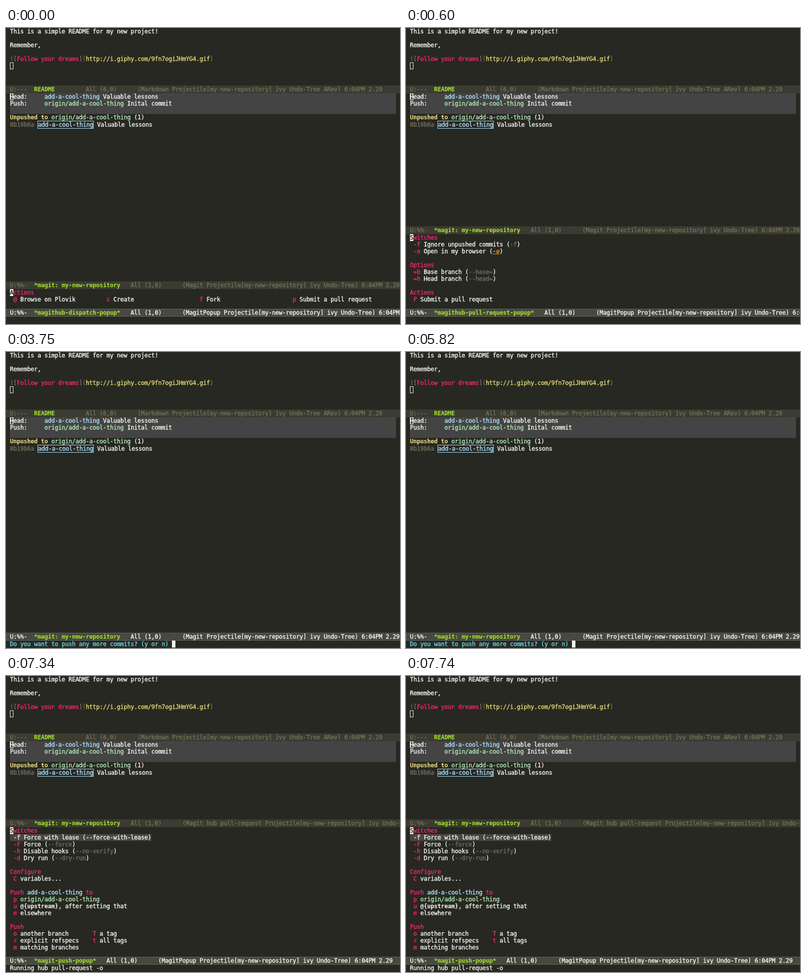
Write an HTML page that moves like this. It is 800 by 603 pixels and loops after 8000 ms.

```html
<!DOCTYPE html>
<html lang="en">
<head>
<meta charset="utf-8">
<title>Editor session</title>
<style>
  html, body { margin: 0; width: 100%; height: 100%; overflow: hidden; background: #272822; }
  #stage {
    position: relative; width: 800px; height: 603px; overflow: hidden;
    background: #272822; color: #f8f8f2;
    font: 12px/14px "DejaVu Sans Mono", monospace; white-space: pre;
    -webkit-text-stroke: 0.35px;
  }
  #stage div { position: absolute; }
  #stage .scene { inset: 0; }
  #stage .bar {
    box-sizing: border-box; left: 0; width: 800px; height: 16px; overflow: hidden;
    border: 1px solid #64645e; border-right: 0; background: #49483e;
  }
  #stage .bar.idle { border-color: #3c3b31; background: #3c3b31; color: #75715e; }
  #stage .shade { left: 8px; top: 133px; width: 784px; height: 42px; background: #444; }
  .p { color: #f92672; }
  .d { color: #75715e; }
  .y { color: #e6db74; }
  .g { color: #b4eeb4; }
  .b { color: #b0e2ff; }
  .c { color: #66d9ef; }
  .n { color: #a6e22e; }
  .t { color: #eedd82; }
  .o { color: #fd971f; font-style: italic; text-decoration: underline; }
  .n, .t, .o, .w { font-weight: bold; -webkit-text-stroke: 0; }
  .k, .h, .l, .r { display: inline-block; height: 14px; vertical-align: top; }
  .k { background: #f8f8f0; color: #272822; }
  .h { box-shadow: inset 0 0 0 1px #f8f8f0; }
  .l { background: #49483e; }
  .r { color: #b0e2ff; border: 1px solid; line-height: 14px; }
</style>
</head>
<body>
<div id="stage"></div>
<script>
const LOOP = 8000, CELL = 7, BOTTOM = 572;
const stage = document.getElementById('stage');

// Make every character exactly one cell wide.
const probe = document.createElement('span');
probe.textContent = 'x'.repeat(100);
stage.append(probe);
const advance = probe.getBoundingClientRect().width / 100;
probe.remove();
stage.style.letterSpacing = `${CELL - advance}px`;

// "~pword~" gives the word the style class p.
const styled = s => s.replace(/~(\w)(.*?)~/g, '<span class="$1">$2</span>');

function add(parent, className, top, html = '') {
  const el = document.createElement('div');
  el.className = className;
  if (top !== null) el.style.top = `${top}px`;
  el.innerHTML = html;
  parent.append(el);
  return el;
}

function text(parent, top, lines, lineHeight = 14) {
  const el = add(parent, '', top, styled(lines.join('\n')));
  el.style.left = '8px';
  el.style.lineHeight = `${lineHeight}px`;
}

function bar(parent, top, idle, name, gap, place, modes, flags = 'U:%%-') {
  const content = ` ${flags}  ~n${name}~${' '.repeat(gap)}All ${place}      ` +
    `(${modes}) 6:04PM 2.29`;
  add(parent, idle ? 'bar idle' : 'bar', top, styled(content));
}

const modeList = (mode, extra = '') => `${mode} Projectile[my-new-repository] ivy Undo-Tree${extra}`;

function magitBar(parent, top, idle, mode = 'Magit') {
  bar(parent, top, idle, '*magit: my-new-repository', 3, '(1,0)', modeList(mode));
}

// Key and label pairs in columns 27 cells wide; the style marks add 3 characters.
const columns = (...items) =>
  ' ' + items.map(([key, label]) => `~p${key}~ ${label}`.padEnd(30)).join('');

// Unchanging upper windows
text(stage, 0, [
  'This is a simple README for my new project!',
  '',
  'Remember,',
  '',
  '~d![~~pFollow your dreams~~d](~~yhttp://i.giphy.com/9fn7ogiJHmYG4.gif~~d)~',
  '~h ~',
]);
bar(stage, 117, true, 'README', 9, '(6,0)', modeList('Markdown', ' ARev'), 'U:---');
add(stage, 'shade', null);
text(stage, 133, [
  '~hH~ead:     ~badd-a-cool-thing~ Valuable lessons',
  'Push:     ~gorigin/add-a-cool-thing~ Inital commit',
  '',
  '~tUnpushed to~ ~gorigin/add-a-cool-thing~ (1)',
]);
text(stage, 189, ['~d8b19b6a~ ~radd-a-cool-thing~ Valuable lessons'], 16);

const running = 'Running hub pull-request -o';

const scenes = [
  { start: 0, split: 516, popup: '*magithub-dispatch-popup*', lines: [
    '~kA~~pctions~',
    columns(['@', 'Browse on Plovik'], ['c', 'Create'], ['f', 'Fork'], ['p', 'Submit a pull request']),
  ] },
  { start: 600, split: 404, popup: '*magithub-pull-request-popup*', lines: [
    '~kS~~pwitches~',
    ' ~p-f~ Ignore unpushed commits (~d-f~)',
    ' ~p-o~ Open in my browser (~o-o~)',
    '',
    '~pOptions~',
    ' ~p=b~ Base branch (~d--base=~)',
    ' ~p=h~ Head branch (~d--head=~)',
    '',
    '~pActions~',
    ' ~pP~ Submit a pull request',
  ] },
  { start: 3750, echo: '~cDo you want to push any more commits? (y or n) ~~k ~' },
  { start: 7200, echo: running },
  { start: 7340, split: 292, mode: 'Magit hub pull-request', popup: '*magit-push-popup*', echo: running, lines: [
    '~kS~~pwitches~',
    '~l -f Force with lease (--force-with-lease)~',
    ' ~p-F~ Force (~d--force~)',
    ' ~p-h~ Disable hooks (~d--no-verify~)',
    ' ~p-d~ Dry run (~d--dry-run~)',
    '',
    '~pConfigure~',
    ' ~pC~ variables...',
    '',
    '~pPush~ ~badd-a-cool-thing~ ~pto~',
    ' ~pp~ ~gorigin/add-a-cool-thing~',
    ' ~pu~ ~w@{upstream}~, after setting that',
    ' ~pe~ elsewhere',
    '',
    '~pPush~',
    ' ~po~ another branch       ~pT~ a tag',
    ' ~pr~ explicit refspecs    ~pt~ all tags',
    ' ~pm~ matching branches',
  ] },
];

scenes.forEach((scene, i) => {
  const layer = add(stage, 'scene', null);
  if (scene.popup) {
    magitBar(layer, scene.split, true, scene.mode);
    text(layer, scene.split + 16, scene.lines);
    bar(layer, BOTTOM, false, scene.popup, 3, '(1,0)', modeList('MagitPopup'));
  } else {
    magitBar(layer, BOTTOM, false);
  }
  if (scene.echo) text(layer, BOTTOM + 16, [scene.echo]);

  const from = scene.start / LOOP;
  const to = (scenes[i + 1]?.start ?? LOOP) / LOOP;
  const steps = [[1, from], [1, to]];
  if (from > 0) steps.unshift([0, 0], [0, from]);
  if (to < 1) steps.push([0, to], [0, 1]);
  layer.animate(steps.map(([opacity, offset]) => ({ opacity, offset })),
    { duration: LOOP, iterations: Infinity });
});
</script>
</body>
</html>
```
